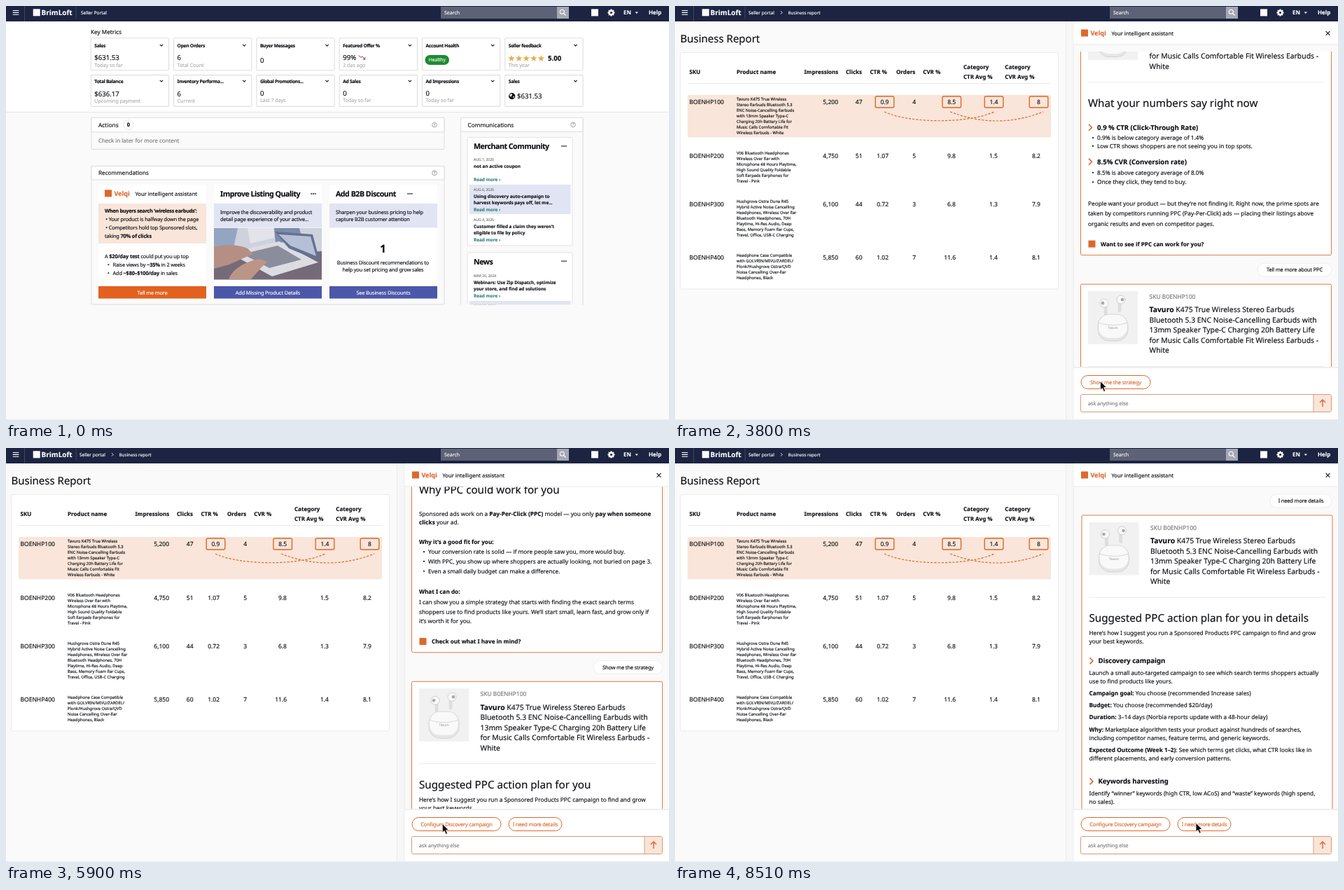
An HTML page that plays this animation: 947 by 591 pixels, repeating every 9.78 s.

```html
<!DOCTYPE html>
<html lang="en">
<head>
<meta charset="utf-8">
<title>Seller portal assistant</title>
<style>
html, body { margin: 0; width: 100%; height: 100%; overflow: hidden; background: #fafafa; }
svg { display: block; width: 100vw; height: 100vh; }
text { font-family: "Noto Sans", "Open Sans", sans-serif; color: #0d0f13; fill: currentColor; stroke: currentColor; stroke-width: .14; text-rendering: geometricPrecision; white-space: pre; }
.b { font-weight: 700; }
.h { font-weight: 600; letter-spacing: -.048em; }
.k { letter-spacing: -.024em; }
.m { text-anchor: middle; }
.e { text-anchor: end; }
.w { color: #fff; }
.g { color: #acacac; }
.d { color: #777; }
.o { color: #dc682c; }
.t { color: #33807c; }
</style>
</head>
<body>
<svg id="stage" viewBox="0 0 947 591"></svg>
<script>
const ORANGE = '#dc682c', LILAC = '#e1e4f2', PEACH = '#f9e5d9', NAVY = '#1c2442';
const SELLER = 'BrimLoft', BOT = 'Velqi', MAKER = 'Tavuro';

// **double stars** mark bold runs
const rich = s => s.replace(/\*\*(.+?)\*\*/g, '<tspan class="b">$1</tspan>');
const text = (x, y, s, size = 8.27, cls = '') =>
  `<text x="${x}" y="${y}" font-size="${size}" class="${cls}">${rich(String(s))}</text>`;
const lines = (x, y, gap, list, size, cls) =>
  list.map((s, i) => text(x, y + i * gap, s, size, cls)).join('');
const rect = (x, y, w, h, fill, extra = '') =>
  `<rect x="${x}" y="${y}" width="${w}" height="${h}" fill="${fill}" ${extra}/>`;
const box = (x, y, w, h, stroke = '#dedede', fill = '#fff', r = 1.5, sw = 1.1) =>
  rect(x, y, w, h, fill, `stroke="${stroke}" stroke-width="${sw}" rx="${r}"`);
const disc = (x, y, r, fill, extra = '') => `<circle cx="${x}" cy="${y}" r="${r}" fill="${fill}" ${extra}/>`;
const path = (d, stroke, sw = 1, extra = '') =>
  `<path d="${d}" fill="none" stroke="${stroke}" stroke-width="${sw}" ${extra}/>`;
const area = (d, fill) => `<path d="${d}" fill="${fill}"/>`;
const group = (id, body, extra = '') => `<g id="${id}" ${extra}>${body}</g>`;

const mark = (x, y, fill = ORANGE) => rect(x, y, 10, 10, fill);
const dots = (x, y) => [-2.7, 0, 2.7].map(d => disc(x + d, y, 1, '#222')).join('');
const down = (x, y) => path(`M${x - 2.2} ${y - 1.1}l2.2 2.2 2.2-2.2`, '#222', 1.1);
const help = (x, y) => disc(x, y, 3.3, 'none', 'stroke="#777" stroke-width=".7"') + text(x, y + 1.9, '?', 5, 'm d');
const brand = (x, y) => mark(x, y - 8.3) + text(x + 13.4, y, BOT, 9.1, 'b o') +
  text(x + 43.4, y, 'Your intelligent assistant', 7.67);

function topBar() {
  const teeth = Array.from({ length: 8 }, (_, i) =>
    `<rect x="863.5" y="4.7" width="2" height="9.6" fill="#fff" transform="rotate(${i * 45} 864.5 9.5)"/>`).join('');
  return rect(0, 0, 947, 22, NAVY) +
    path('M9.7 6.5h8.6M9.7 9.4h8.6M9.7 12.3h8.6', '#fff', 1.1) +
    path('M26.5 0v22M100 1v17', '#47506d', .8) +
    mark(38.7, 4.3, '#fff') + text(50.5, 13.2, SELLER, 10, 'b w') +
    rect(621, 1, 166, 17, '#5d6276') + text(626, 12, 'Search', 7, 'w') +
    rect(787, 1, 17, 17, '#a5a8b4') +
    disc(794.3, 8.3, 3, 'none', 'stroke="#fff" stroke-width="1.1"') + path('M796.5 10.5l3.2 3.2', '#fff', 1.2) +
    mark(836, 4.4, '#fff') +
    teeth + disc(864.5, 9.5, 3.8, '#fff') + disc(864.5, 9.5, 1.6, NAVY) +
    text(882, 12.3, 'EN', 8, 'b w') + area('M898.6 8.5h4.4l-2.2 2.6z', '#fff') +
    text(918, 12.3, 'Help', 8, 'b w');
}

function metrics() {
  const cards = [
    ['Sales', '$631.53', 'Today so far'], ['Open Orders', '6', 'Total Count'], ['Buyer Messages', '0', ''],
    ['Featured Offer %', '99%', '2 das ago'], ['Account Health', '', ''], ['Seller feedback', '', 'This year'],
    ['Total Balance', '$636.17', 'Upcoming payment'], ['Inventory Performa...', '6', 'Current'],
    ['Global Promotions...', '0', 'Last 7 days'], ['Ad Sales', '0', 'Today so far'],
    ['Ad Impressions', '0', 'Today so far'], ['Sales', '', '']
  ];
  const star = cx => {
    const pts = Array.from({ length: 10 }, (_, i) => {
      const a = i * Math.PI / 5, r = i % 2 ? 2.1 : 5;
      return (cx + r * Math.sin(a)).toFixed(2) + ',' + (75 - r * Math.cos(a)).toFixed(2);
    });
    return `<polygon points="${pts.join(' ')}" fill="#e3b04e"/>`;
  };
  return cards.map(([name, value, note], i) => {
    const row = i > 5 ? 1 : 0, x = 121.3 + (i % 6) * 118.3, y = row ? 98.6 : 45.8;
    const lift = row && i > 7 ? .7 : 0;
    const base = i === 2 ? 80.7 : row ? 128.6 - lift : 76.8;
    return box(x, y, 111.3, row ? 44.8 : 46) +
      text(x + 5, (row ? 110.3 : 59) - lift, name, 6.7, 'b" letter-spacing="-.28') +
      down(x + 100.7, row ? 107 : 56) + text(x + 5, base, value, 9.6) +
      text(x + 5, (row ? 138 : 87) - lift, note, 7.1, 'g');
  }).join('') +
    path('M503.8 70.5l3 3 2-1.6 3.6 4M509.8 76.2h3v-3', '#8f2a2a', 1) +
    rect(598.5, 70, 34.5, 14, '#1e8a30', 'rx="7"') + text(615.8, 79.4, 'Healthy', 6.7, 'm w') +
    [722, 732.6, 743.2, 753.8, 764.4].map(star).join('') + text(774, 78.4, '5.00', 9.7, 'b') +
    disc(722.7, 128.7, 4.6, '#111') + area('M719 127l3-2 1 2-2 3zM724 129l2 0-1 3z', '#fff') + text(730, 132.3, '$631.53', 9.6);
}

// desk scene in flat tones
function photo() {
  return '<g clip-path="url(#photoClip)">' + rect(297, 317, 154, 74, '#cdd2dc') +
    area('M297 317h34l-6 28-28 8z', '#93a5c2') + area('M345 317h38v14l-34 8z', '#e3e4e9') +
    area('M383 317h36l4 16-38 6z', '#7d8cab') + area('M297 364l154-14v41H297z', '#756a78') +
    area('M318 352l72-16 56 30-66 20z', '#dcdce2') + area('M338 354l50-12 34 20-46 12z', '#8a8d9c') +
    area('M384 322l54 4 10 38-44-18z', '#65718f') + area('M389 326l46 3 8 28-37-15z', '#b5c0d6') +
    area('M297 344c18-4 34-4 48 2l8 8-12 5-22 10-22 6z', '#b58f84') +
    area('M318 391c4-14 22-26 44-30l11 4-8 8-16 18z', '#bd9587') + '</g>';
}

function homePage() {
  const readMore = y => text(668, y, 'Read more ›', 6.4, 'b t');
  const news = (y, date, list, more) =>
    text(668, y, date, 5.05, 'd') + lines(668, y + 10, 8.7, list, 6.4, 'b') + readMore(more);
  const button = (x, label, fill) => rect(x, 400, 154, 17.6, fill) + text(x + 77, 411.6, label, 7.4, 'k m w');
  return text(107, 12, 'Seller Portal', 6.5, 'w') +
    rect(0, 22, 947, 129, '#fff') + path('M0 151.5h947', '#e4e4e4') +
    text(121, 39.5, 'Key Metrics', 8.2) + metrics() +
    box(122, 159.5, 504, 45, '#dedede', '#fafafa') + box(122, 159.5, 504, 20.5) +
    text(132, 172.6, 'Actions', 8.4) + disc(175, 169.7, 7, '#fff', 'stroke="#ddd" stroke-width=".8"') +
    text(175, 172.4, '0', 7.6, 'b m') + help(612, 169.7) +
    text(132, 195, 'Check in later for more content', 7.9, 'd') +
    box(122, 228.5, 504, 197.5, '#dedede', '#fafafa') + box(122, 228.5, 504, 19.5) +
    text(132, 241.2, 'Recommendations', 8.17) + help(612, 238.3) +
    [132, 297, 462].map(x => rect(x, 255, 154, 162, '#fff')).join('') +
    brand(141, 270.7) + rect(132, 282, 154, 57, PEACH) +
    text(141, 295.3, 'When buyers search ‘wireless earbuds’:', 7.3, 'b" letter-spacing="-.28') +
    text(142.3, 307.3, '• Your product is halfway down the page', 7.4, 'k') +
    text(142.3, 319.2, '• Competitors hold top Sponsored slots,', 7.4, 'k') +
    text(141, 331.2, 'taking **70% of clicks**', 7.4, 'k') +
    text(141, 360.2, 'A **$20/day test** could put you up top', 7.4, 'k') +
    lines(145, 372.4, 12, ['•', '•'], 7.4) +
    text(152.5, 372.4, 'Raise views by **~35%** in 2 weeks', 7.4, 'k') +
    text(152.5, 384.2, 'Add **~$80–$100/day** in sales', 7.4, 'k') +
    button(132, 'Tell me more', '#e2611f') +
    text(306, 272.2, 'Improve Listing Quality', 10.7, 'h') + dots(439, 268) + rect(297, 282, 154, 34.5, LILAC) +
    lines(306, 297.4, 9.8, ['Improve the discoverability and product', 'detail page experience of your active...'], 7.4, 'k') +
    photo() + button(297, 'Add Missing Product Details', '#4b57a9') +
    text(471, 272.2, 'Add B2B Discount', 10.7, 'h') + dots(577, 268) + rect(462, 282, 154, 34.5, LILAC) +
    lines(471, 297.4, 9.8, ['Sharpen your business pricing to help', 'capture B2B customer attention'], 7.4, 'k') +
    text(538.5, 351.7, '1', 15.5, 'b m') +
    lines(538.5, 369.3, 9.9, ['Business Discount recommendations to', 'help you set pricing and grow sales'], 7.4, 'k m') +
    button(462, 'See Business Discounts', '#4b57a9') +
    '<g clip-path="url(#newsClip)">' +
    box(649.5, 159.5, 174.5, 280, '#dedede', '#fafafa') + box(649.5, 159.5, 174.5, 20) +
    text(659.5, 172.6, 'Communications', 8.27) + help(810, 169.5) +
    box(659, 187.5, 150, 154.5, '#e4e4e4') + text(668, 204.2, 'Merchant Community', 10.7, 'h') + dots(797, 200) +
    news(221, 'AUG 7, 2025', ['not an active coupon'], 249.6) +
    rect(662, 255, 144.5, 42, LILAC) +
    news(264, 'AUG 6, 2025', ['Using discovery auto-campaign to', 'harvest keywords pays off, let me...'], 292.6) +
    news(307.2, 'AUG 4, 2025', ['Customer filled a claim they weren’t', 'eligible to file by policy'], 336) +
    box(659, 352, 150, 100, '#e4e4e4') + text(668, 368.8, 'News', 10.7, 'h') + dots(797, 364.3) +
    news(387, 'MAR 20, 2024', ['Webinars: Use Zip Dispatch, optimize', 'your store, and find ad solutions'], 416) +
    rect(662, 421, 144.5, 20, LILAC) + text(668, 430, 'MAR 20, 2024', 5.05, 'd') + '</g>';
}

function reportTable() {
  const heads = [[20.5, 'SKU'], [88, 'Product name'], [184.5, 'Impressions'], [244, 'Clicks'],
    [278.5, 'CTR %'], [316, 'Orders'], [354.3, 'CVR %']];
  const rows = [
    [140.2, 135.2, 'BOENHP100', '5,200 47 0.9 4 8.5 1.4 8',
      MAKER + ' K475 True Wireless|Stereo Earbuds Bluetooth 5.3|ENC Noise-Cancelling Earbuds|with 13mm Speaker Type-C|Charging 20h Battery Life for|Music Calls Comfortable Fit|Wireless Earbuds - White'],
    [216.7, 212, 'BOENHP200', '4,750 51 1.07 5 9.8 1.5 8.2',
      'V06 Bluetooth Headphones|Wireless Over Ear with|Microphone 48 Hours Playtime,|High Sound Quality Foldable|Soft Earpads Earphones for|Travel - Pink'],
    [285.6, 281, 'BOENHP300', '6,100 44 0.72 3 6.8 1.3 7.9',
      'Hushgrove Ostra Dune R45|Hybrid Active Noise Cancelling|Headphones, Wireless Over Ear|Bluetooth Headphones, 70H|Playtime, Hi-Res Audio, Deep|Bass, Memory Foam Ear Cups,|Travel, Office, USB-C Charging'],
    [362.2, 357.7, 'BOENHP400', '5,850 60 1.02 7 11.6 1.4 8.1',
      'Headphone Case Compatible|with GOLVRIN/MIVU/ZARDEL/|Plonk/Hushgrove Ostra/QVD|Noise Cancelling Over-Ear|Headphones, Black']
  ];
  const ends = [233, 267.5, 305, 344, 401, 461, 522];
  const boxed = { 2: 299.5, 4: 395.2, 5: 455.5, 6: 519.5 };
  return text(105, 12, 'Seller portal', 6.5, 'w') + path('M151 7.2l2.2 2.2-2.2 2.2', '#fff', .9) +
    text(161.5, 12, 'Business report', 6.25, 'w') +
    text(7.5, 52, 'Business Report', 15) + box(7.5, 66.5, 540, 337.5, '#ebebeb', '#fff', 2, 1) +
    heads.map(([x, s]) => text(x, 97, s, 8, 'b')).join('') +
    lines(412, 89.7, 14.6, ['Category', 'CTR Avg %'], 8, 'b') + lines(471.3, 89.7, 14.6, ['Category', 'CVR Avg %'], 8, 'b') +
    path('M18 110.5h519', '#e9e9e9') + rect(18, 127, 519, 60.5, PEACH, 'rx="2"') +
    rows.map(([y, top, sku, nums, desc], r) => text(20.5, y, sku, 8.5) +
      lines(88, top, 7.95, desc.split('|'), 5.8) +
      nums.split(' ').map((n, c) => r === 0 && boxed[c]
        ? box(boxed[c] - 13.3, 129, 26.6, 16, ORANGE, 'none', 2, 1.4) + text(boxed[c], y, n, 8.5, 'm')
        : text(ends[c], y, n, 8.5, 'e')).join('')).join('') +
    path('M299 151C335 168 420 168 456 151M393 151Q460 177 526 151', ORANGE, 1.2, 'stroke-dasharray="3.2 2"');
}

function productHead() {
  const bud = (x, y, s) => rect(x - 2.4 + s, y + 1, 4.8, 17, '#dedede', 'rx="2.4"') +
    disc(x, y, 6, '#f9f9f9', 'stroke="#c6c6c6" stroke-width=".8"') + disc(x - s, y, 2.3, '#a9a9a9');
  return rect(590, 10, 71, 75.5, '#f1f1f1') + bud(613, 27, 2) + bud(637, 22, -2) +
    rect(604, 43, 43, 38, '#e6e6e6', 'rx="16" stroke="#cfcfcf" stroke-width=".8"') +
    rect(605, 43.5, 41, 33, '#f9f9f9', 'rx="15"') +
    path('M604.5 55q21 7 42 0', '#d0d0d0', .8) + text(625.5, 64, MAKER, 4.4, 'm g') +
    text(677.5, 21, 'SKU B0ENHP100', 8.5, 'd') +
    lines(677.5, 40.2, 14.5, [`**${MAKER}** K475 True Wireless Stereo Earbuds`, 'Bluetooth 5.3 ENC Noise-Cancelling Earbuds with',
      '13mm Speaker Type-C Charging 20h Battery Life', 'for Music Calls Comfortable Fit Wireless Earbuds -', 'White'], 10.4) +
    path('M590 117.3h338', '#ececec');
}

const bullets = (y, list) => list.map(([dy, s]) => disc(597, y + dy - 2.8, 1.1, '#16191f') + text(603, y + dy, s)).join('');
const point = (y, s) => path(`M591 ${y - 8}l4.4 4.5-4.4 4.5`, ORANGE, 1.6) + text(603, y, s, 9.55, 'b');
const ask = (y, s) => mark(590.5, y - 8.2) + text(608, y, s, 8.15, 'b');
const card = (dx, top, h, title, body) => `<g transform="translate(${dx} ${top})">` +
  box(579.5, 0, 358, h, '#dd7a45', '#fff', 2, 1) + productHead() + text(590, 152.3, title, 15.2) + body + '</g>';
const bubble = (y, w, s) => box(938 - w, y, w, 19, '#ececec', '#fff', 9.5, .9) + text(938 - w / 2, y + 12.2, s, 7.5, 'k m');
const INTRO = ['Here’s how I suggest you run a Sponsored Products PPC campaign to find and grow', 'your best keywords.'];

function chat() {
  const plan = [['Find what works (week 1-2)', 'Run a short auto campaign to discover search terms that bring clicks and sales.'],
    ['Focus on winners (week 3)', 'Move the best terms into targeted campaigns for better placement.'],
    ['Cut waste fast (ongoing)', 'Stop spending on keywords that don’t convert.'],
    ['Grow only if it’s worth it (after results)', 'Scale bids and budget for proven winners.']];
  return card(0, 66, 364, 'What your numbers say right now',
    point(185.4, '0.9 % CTR (Click-Through Rate)') +
    bullets(199.3, [[0, '0.9% is below category average of 1.4%'], [11.8, 'Low CTR shows shoppers are not seeing you in top spots.']]) +
    point(234.2, '8.5% CVR (Conversion rate)') +
    bullets(249, [[0, '8.5% is above category average of 8.0%'], [13.6, 'Once they click, they tend to buy.']]) +
    lines(590, 293, 14.7, ['People want your product — but they’re not finding it. Right now, the prime spots are',
      'taken by competitors running PPC (Pay-Per-Click) ads — placing their listings above',
      'organic results and even on competitor pages.']) +
    ask(351.2, 'Want to see if PPC can work for you?')) +
  group('turn1', bubble(441.5, 106, 'Tell me more about PPC') +
    card(0, 471.5, 379.5, 'Why PPC could work for you',
      lines(590, 184.4, 12, ['Sponsored ads work on a **Pay-Per-Click (PPC)** model — you only **pay when someone**', '**clicks** your ad.']) +
      text(590, 224.6, 'Why it’s a good fit for you:', 8.2, 'b') +
      bullets(238.6, [[0, 'Your conversion rate is solid — if more people saw you, more would buy.'],
        [13.8, 'With PPC, you show up where shoppers are actually looking, not buried on page 3.'],
        [27.6, 'Even a small daily budget can make a difference.']]) +
      text(590, 296, 'What I can do:', 8.2, 'b') +
      lines(590, 310.4, 13.8, ['I can show you a simple strategy that starts with finding the exact search terms',
        'shoppers use to find products like yours. We’ll start small, learn fast, and grow only if', 'it’s worth it for you.']) +
      ask(367, 'Check out what I have in mind?'))) +
  group('turn2', bubble(862.5, 99, 'Show me the strategy') +
    card(0, 892.5, 377, 'Suggested PPC action plan for you', lines(590, 171.4, 12, INTRO) +
      plan.map(([a, b], i) => point(211.4 + i * 37, a) + text(590, 225.4 + i * 37, b)).join('') +
      ask(364, 'You will have to approve every action I take.'))) +
  group('turn3', bubble(1281, 88, 'I need more details') +
    card(1.5, 1311, 700, 'Suggested PPC action plan for you in details', lines(590, 171.4, 12, INTRO) +
      point(211.4, 'Discovery campaign') +
      lines(590, 228.4, 12, ['Launch a small auto-targeted campaign to see which search terms shoppers actually', 'use to find products like yours.']) +
      lines(590, 257.4, 17, ['**Campaign goal:** You choose (recommended Increase sales)', '**Budget:** You choose (recommended $20/day)',
        '**Duration:** 3–14 days (Norbia reports update with a 48-hour delay)']) +
      lines(590, 308.8, 12, ['**Why:** Marketplace algorithm tests your product against hundreds of searches,', 'including competitor names, feature terms, and generic keywords.']) +
      lines(590, 338, 12, ['**Expected Outcome (Week 1–2)**: See which terms get clicks, what CTR looks like in', 'different placements, and early conversion patterns.']) +
      point(383.4, 'Keywords harvesting') +
      lines(590, 400, 12, ['Identify “winner” keywords (high CTR, low ACoS) and “waste” keywords (high spend,', 'no sales).'])));
}

function panel() {
  const pill = (x, w, s) => box(x, 527.5, w, 19, ORANGE, '#fff', 9.5, 1) + text(x + w / 2, 539.7, s, 7.5, 'k m o');
  return rect(558, 22, 11, 569, '#f7f7f7') + rect(569, 22, 378, 569, '#fafafa') + path('M558.5 22v569M569 22v569', '#e8e8e8', .9) +
    '<g clip-path="url(#chatClip)">' + group('scroll', chat()) + '</g>' +
    rect(569.5, 22, 378, 32.5, '#fff') + path('M569 55h378', '#ebebeb') + brand(580, 41.8) +
    path('M929.6 36l5.8 5.8m0-5.8l-5.8 5.8', '#222', 1.1) +
    rect(569.5, 515, 378, 2, '#efefef') + rect(569.5, 517, 378, 74, '#fff') +
    group('reply0', pill(580, 106, 'Tell me more about PPC') + pill(697, 76, 'I need more details')) +
    group('reply1', pill(580, 99, 'Show me the strategy')) +
    group('reply2', pill(580, 127, 'Configure Discovery campaign') + pill(718, 76, 'I need more details')) +
    box(579.5, 554.5, 358, 25, '#d79a78', '#fff', 2, 1) + rect(912.5, 555, 24.5, 24, PEACH) +
    path('M912 555v24.5', '#d79a78') + path('M925 572v-9.5M921 566l4-4 4 4', ORANGE, 1.4) +
    text(590, 570, 'ask anything else', 7.1, 'd');
}

const clip = (id, x, y, w, h) => `<clipPath id="${id}"><rect x="${x}" y="${y}" width="${w}" height="${h}"/></clipPath>`;
const stage = document.getElementById('stage');
stage.innerHTML = '<defs>' + clip('photoClip', 297, 317, 154, 73.5) + clip('newsClip', 645, 155, 185, 271.5) +
  clip('chatClip', 569.5, 65, 378, 452) + '</defs>' + rect(0, 0, 947, 591, '#fafafa') + topBar() +
  group('home', homePage()) + group('report', reportTable() + panel()) + path('M0 590.5h947', '#ebebeb') +
  group('cursor', '<path d="M0 0V12.6L2.9 10 5 14.9 7.3 13.9 5.2 9.2 9 9z" fill="#0b0b0b" stroke="#fff" stroke-width=".8"/>');

const LOOP = 9780;
// first step at, last step at, steps, phase shift, from, to
const pointerMoves = [
  [430, 830, 6, -1, [17, 443], [203, 373.5]],
  [1980, 2790, 11, .455, [202, 374], [616, 538]],
  [3210, 3210, 1, 0, [616, 538], [607.5, 535.5]],
  [4540, 4710, 3, 0, [607.5, 535.5], [623.3, 536.5]],
  [6660, 7080, 6, 0, [623.3, 536.5], [744, 535.3]]
];
const scrollMoves = [
  [3720, 4200, 7, 0, [0], [375]],
  [5730, 6230, 7, .16, [375], [821.5]],
  [8020, 8510, 7, -.71, [821.5], [1215]]
];

// eased progress, held between steps
function progress([first, last, n, shift], t) {
  if (t < first) return 0;
  const gap = (last - first) / (n - 1) || 1;
  const k = Math.min(n, Math.floor((t - first) / gap + .01) + 1);
  const p = n === 1 ? 1 : (k + shift) / (n + shift);
  return p * p * (3 - 2 * p);
}
const current = (moves, t) => moves.filter(m => t >= m[0]).pop() || moves[0];
const mix = (a, b, p) => a + (b - a) * p;
const el = id => document.getElementById(id);
const show = (id, on) => el(id).setAttribute('display', on ? 'inline' : 'none');
const chatRect = document.querySelector('#chatClip rect');

function draw(t) {
  show('home', t < 1140);
  show('report', t >= 1140);
  show('turn1', t >= 3210);
  show('turn2', t >= 5220);
  show('turn3', t >= 7510);
  show('reply0', t < 3210);
  show('reply1', t >= 3210 && t < 5220);
  show('reply2', t >= 5220);
  show('cursor', t >= 430);

  const top = t < 5220 ? 65 : 55;
  chatRect.setAttribute('y', top);
  chatRect.setAttribute('height', 517 - top);

  const s = current(scrollMoves, t);
  el('scroll').setAttribute('transform', `translate(0 ${-mix(s[4][0], s[5][0], progress(s, t))})`);

  const m = current(pointerMoves, t), p = progress(m, t);
  el('cursor').setAttribute('transform', `translate(${mix(m[4][0], m[5][0], p)} ${mix(m[4][1], m[5][1], p ** 1.4)})`);
}

const began = performance.now();
function tick() {
  draw((performance.now() - began) % LOOP);
  requestAnimationFrame(tick);
}
tick();
</script>
</body>
</html>
```
